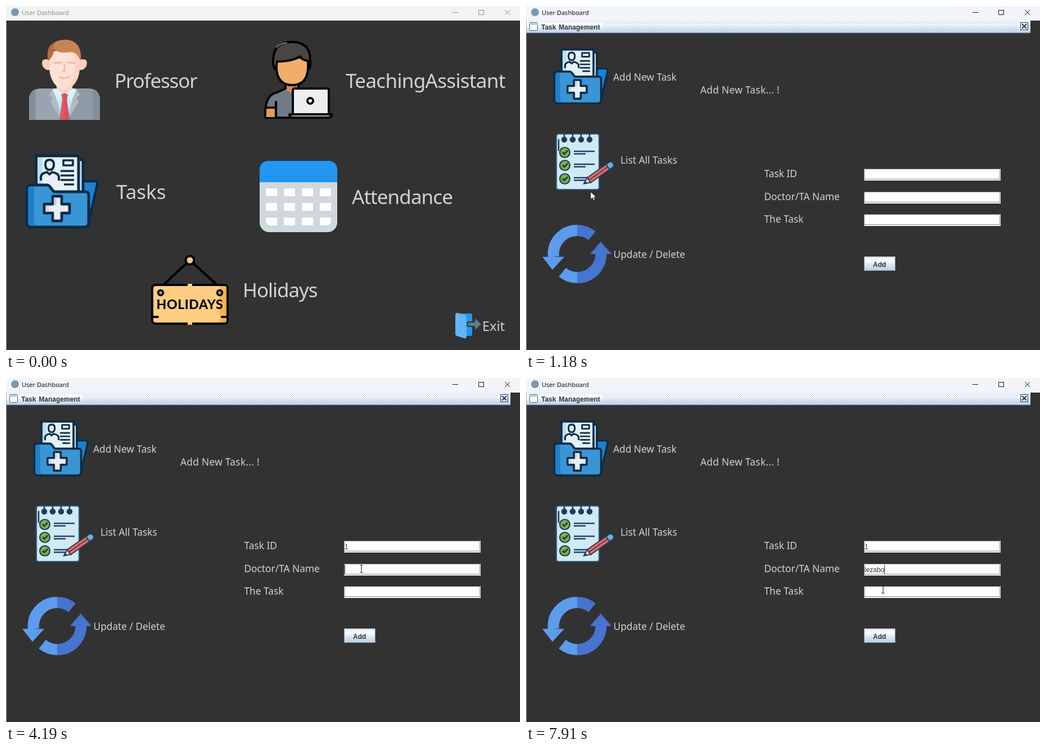
An HTML page that plays this animation: 914 px wide and 613 px high, repeating every 8000 ms.

```html
<!DOCTYPE html>
<html lang="en">
<head>
<meta charset="utf-8">
<title>User Dashboard</title>
<style>
  html, body { margin: 0; width: 100%; height: 100%; overflow: hidden; background: #323232; }
  svg { display: block; }
  text { white-space: pre; }
  .label { font-family: "Noto Sans", sans-serif; fill: #d2d2d2; }
  .big { font-size: 35px; }
  .small { font-size: 17.3px; }
  .ui { font: 12px "Liberation Sans", Arial, sans-serif; fill: #333; }
  .bold { font-weight: bold; }
  .ink { fill: none; stroke: #000; stroke-width: 4; stroke-linecap: round; stroke-linejoin: round; }
  .navy { stroke: #0b2c44; stroke-width: 4.8; stroke-linejoin: round; }
</style>
</head>
<body>
<svg width="914" height="613" viewBox="0 0 914 613">
  <defs>
    <linearGradient id="metal" x2="0" y2="1">
      <stop offset="0" stop-color="#dde8f3"/><stop offset=".3" stop-color="#fff"/>
      <stop offset=".55" stop-color="#dde8f3"/><stop offset="1" stop-color="#b8cfe5"/>
    </linearGradient>
    <linearGradient id="bar" x2="0" y2="1">
      <stop offset="0" stop-color="#e6eef7"/><stop offset=".3" stop-color="#fff"/><stop offset="1" stop-color="#b8cfe5"/>
    </linearGradient>
    <pattern id="bumps" width="4" height="4" patternUnits="userSpaceOnUse">
      <path d="M0 0h1v1h-1zM2 2h1v1h-1z" fill="#fff"/>
      <path d="M1 1h1v1h-1zM3 3h1v1h-1z" fill="#7d9fc4"/>
    </pattern>
    <g id="folder">
      <path class="navy" d="M119 312H157Q164 312 162 320L146 388Q143 394 136 394H110Z" fill="#1a83d2"/>
      <path class="navy" d="M122 274H137V345H122Z" fill="#bcdcf0"/>
      <path class="navy" d="M54 267H129V345H54Z" fill="#e6f0f8"/>
      <path d="M56 270H65V322H56Z" fill="#bcdcf0"/>
      <path class="navy" d="M70 282Q70 274 77.500 274T85 282Q85 292 77.500 292T70 282Z" fill="#e6f0f8" style="stroke-width:4"/>
      <path class="navy" d="M62 311V304Q63 298 73 296L77.500 300 82 296Q93 298 94 304V311" fill="none" style="stroke-width:4"/>
      <path class="navy" d="M102 275H119V284H102ZM97 294H121M97 302H121M97 310H121M103 318H121" fill="none" style="stroke-width:3.600"/>
      <path class="navy" d="M37 326Q37 319 44 319H73Q76 319 79 323L85 331H141Q147 331 147 337V386Q147 394 139 394H45Q37 394 37 386Z" fill="#3a95d6"/>
      <path d="M39.500 326Q39.500 321.500 45 321.500H50V380Q50 388 55 391.500H45Q39.500 391.500 39.500 385Z" fill="#1d7fcb"/>
      <path class="navy" d="M83 339H99V353H113V369H99V383H83V369H68V353H83Z" fill="#e8eef5"/>
      <path d="M85.500 341.500H90V355.500H85.500ZM70.500 355.500H76V366.500H70.500Z" fill="#c6d6e8"/>
    </g>
    <g id="field">
      <rect width="243" height="21" fill="#fff"/>
      <path d="M.5 20V.5H241.500V19M1 18.500H242" fill="none" stroke="#7a8a99"/>
    </g>
    <g id="check">
      <circle r="9" fill="#7cb342" stroke="#23395d" stroke-width="2.200"/>
      <path d="M-4-.5-1 3 5-3.500" fill="none" stroke="#1f3a52" stroke-width="2.800"/>
      <path d="M16-2H53M16 2.500H37" stroke="#23406b" stroke-width="2.400"/>
    </g>
  </defs>

  <rect width="914" height="613" fill="#323232"/>

  <g id="dashboard">
    <!-- professor -->
    <path d="M41 203V168Q41 149 60 147H148Q167 149 167 168V203Z" fill="#9aa4af"/>
    <path d="M104 147H148Q167 149 167 168V203H104Z" fill="#8f9aa6"/>
    <path d="M41 203V168Q41 152 53 148V203ZM155 148Q167 152 167 168V203H155Z" fill="#838f9b"/>
    <path d="M84 147H124L119 180 111 203H97L89 180Z" fill="#c4e8f7"/>
    <path d="M84 147 76 158 83 164 79 171 98 203H101ZM124 147 132 158 125 164 129 171 110 203H107Z" fill="#b2bbc4"/>
    <path d="M90 130H118V150L104 160 90 150Z" fill="#ffcfbf"/>
    <path d="M89 147 104 158 92 169 83 150ZM119 147 104 158 116 169 125 150Z" fill="#d9f3fc"/>
    <path d="M98 158 104 155 110 158 108 166 113 203H95L100 166Z" fill="#de5a64"/>
    <path d="M104 155 110 158 108 166 113 203H104Z" fill="#d4525d"/>
    <path d="M78 95H70Q64 95 64 102Q65 112 74 114H78ZM130 95H138Q144 95 144 102Q143 112 134 114H130Z" fill="#fdcdbc"/>
    <path d="M77 88Q82 78 104 78T131 88V112Q130 131 118 143Q104 156 90 143Q78 131 77 112Z" fill="#ffe0d4"/>
    <path d="M122 84H131V112Q130 131 118 143Q111 150 104 150Q122 136 122 112Z" fill="#ffd2c3"/>
    <path d="M85 101H99M109 101H123" stroke="#f9b9a8" stroke-width="3.500"/>
    <path d="M104 103V116H99M94 126Q104 132 114 125" fill="none" stroke="#f9b9a8" stroke-width="3"/>
    <path d="M75 98Q70 62 104 60Q136 60 133 98L128 89Q125 83 114 82Q95 85 86 78Q83 91 75 98Z" fill="#c68455"/>
    <path d="M75 98Q71 77 80 69Q85 66 88 66 82 75 86 78 83 91 75 98Z" fill="#b06f45"/>

    <!-- assistant -->
    <path class="ink" d="M461 199Q459 158 482 154L497 147V138H520V148L540 154V199Z" style="fill:#707b86"/>
    <path d="M499 138H518V150Q508 157 499 150Z" fill="#d78f4f"/>
    <path d="M463 182H478V198H463Z" fill="#e49b57"/>
    <path class="ink" d="M463 181H478M480 171V198"/>
    <path class="ink" d="M481 92V112Q483 141 509 141T537 112V92Z" style="fill:#f0ae69"/>
    <path class="ink" d="M480 113Q474 110 475 96Q476 64 508 64Q541 64 541 96V104Q541 110 538 112V98Q527 97 523 90Q508 99 482 99Z" style="fill:#4a4542"/>
    <path d="M480 74Q489 65 500 66" fill="none" stroke="#67605c" stroke-width="3"/>
    <rect class="ink" x="510" y="147" width="64" height="47" rx="3" style="fill:#ededed"/>
    <circle cx="541" cy="169" r="5" fill="#fff" stroke="#000" stroke-width="4"/>
    <path class="ink" d="M504 193H579Q579 199 572 199H511Q504 199 504 193Z" style="fill:#a9afb5"/>

    <use href="#folder"/>

    <!-- calendar -->
    <rect x="451" y="276" width="138" height="127" rx="17" fill="#cfd8dc"/>
    <path d="M451 314V293Q451 276 468 276H572Q589 276 589 293V314Z" fill="#2196f3"/>
    <g id="days" fill="#fff"></g>

    <!-- sign -->
    <path d="M282 495 327 453 373 495" class="ink"/>
    <circle cx="327" cy="453" r="7.500" fill="#ffcb80" stroke="#000" stroke-width="4"/>
    <rect class="ink" x="260" y="497" width="134" height="69" rx="6" style="fill:#ffcd82"/>
    <path d="M380 499H389Q392 499 392 503V560Q392 564 388 564H380Z" fill="#f6b347"/>
    <path d="M323 497H331M323 566H331" stroke="#ffcd82" stroke-width="4"/>
    <path class="ink" d="M262 554H270M384 554H392"/>
    <g fill="#999" stroke="#000" stroke-width="3.500"><circle cx="275" cy="511" r="4.500"/><circle cx="380" cy="511" r="4.500"/></g>
    <text x="267.500" y="540" font-family="Lato, sans-serif" font-size="23" font-weight="800" letter-spacing=".6">HOLIDAYS</text>

    <!-- exit -->
    <rect x="806" y="548" width="23" height="40" rx="3" fill="#2196f3"/>
    <path d="M799 551Q799 546 804 547L816 551Q819 552 819 556V589Q819 593 815 592L802 588Q799 587 799 584Z" fill="#64b5f6"/>
    <path d="M824 564H834V557L845 567 834 577V570H824Q821 570 821 567T824 564Z" fill="#607d8b" stroke="#323232" stroke-width="4" paint-order="stroke"/>

    <g class="label big">
      <text x="193" y="145.500" letter-spacing="-1.180">Professor</text>
      <text x="604" y="145.500" letter-spacing="-.68">TeachingAssistant</text>
      <text x="196" y="344">Tasks</text>
      <text x="615" y="353" letter-spacing="-.94">Attendance</text>
      <text x="421" y="519" letter-spacing="-1.050">Holidays</text>
      <text x="847" y="579" font-size="23.500">Exit</text>
    </g>
  </g>

  <g id="tasks">
    <rect x="1" y="26" width="896" height="22" fill="url(#bar)"/>
    <rect x="136" y="29" width="738" height="16" fill="url(#bumps)"/>
    <path d="M1 48H897" stroke="#6382bf"/>
    <rect x="6.500" y="29.500" width="14" height="14" rx="1" fill="#fff" stroke="#44586e"/>
    <path d="M8 31H19V33H8Z" fill="#a3b8cc"/>
    <rect x="879.500" y="29.500" width="13" height="13" fill="#e8f0f8" stroke="#223a63"/>
    <path d="M882 32 890 40M890 32 882 40" stroke="#223a63" stroke-width="2"/>
    <text class="ui bold" x="27" y="42" word-spacing="1.500">Task Management</text>

    <use href="#folder" transform="translate(22.600 -124) scale(.755)"/>

    <!-- task list -->
    <rect x="54" y="228" width="76" height="99" rx="4" fill="#cfeaf3" stroke="#2b5b83" stroke-width="2.200"/>
    <path d="M58 237V258" stroke="#23395d" stroke-width="2.500"/>
    <g id="rings" fill="#23395d" stroke="#23395d" stroke-width="2.500"></g>
    <use href="#check" x="69" y="261"/><use href="#check" x="69" y="284"/><use href="#check" x="69" y="308"/>
    <g transform="translate(103 316.500) rotate(-35)" stroke="#23395d" stroke-width="1.800">
      <path d="M0 0 11-5.500V5.500Z" fill="#f4c9a0"/>
      <path d="M11-5.500H52V5.500H11Z" fill="#e56a62"/>
      <path d="M11 0H52" stroke-width="1.400"/>
      <path d="M52-5.500H59Q63-5 63 0T59 5.500H52Z" fill="#6fb0d2"/>
      <path d="M0 0 4-2V2Z" fill="#23395d"/>
    </g>

    <!-- refresh -->
    <g fill="none" stroke-width="20">
      <path d="M49 447A42 42 0 0 1 91 400" stroke="#5d9cec"/>
      <path d="M91 400A42 42 0 0 1 117.400 409.400" stroke="#4674d0"/>
      <path d="M133 437A42 42 0 0 1 91 484" stroke="#4674d0"/>
      <path d="M91 484A42 42 0 0 1 64.600 474.600" stroke="#5d9cec"/>
    </g>
    <path d="M29 447H68L47 470Z" fill="#5d9cec"/><path d="M114 442H152L133 420Z" fill="#4674d0"/>

    <g class="label small">
      <text x="155" y="133">Add New Task</text>
      <text x="310" y="155.500" letter-spacing=".3">Add New Task... !</text>
      <text x="168" y="281">List All Tasks</text>
      <text x="155.500" y="449">Update / Delete</text>
      <text x="423.500" y="305">Task ID</text>
      <text x="423.500" y="346">Doctor/TA Name</text>
      <text x="423.500" y="386">The Task</text>
    </g>
    <use href="#field" x="601" y="290"/><use href="#field" x="601" y="331"/><use href="#field" x="601" y="371"/>
    <rect x="601.500" y="446.500" width="55" height="25" fill="url(#metal)" stroke="#7a8a99"/>
    <text class="ui bold" x="617" y="464.500">Add</text>
    <text class="ui" id="taskId" x="602" y="305"></text>
    <text class="ui" id="person" x="602" y="346"></text>
    <rect id="caret" width="1" height="16" fill="#333"/>
  </g>

  <rect y="26" width="1" height="587" fill="#a8a8a8"/>
  <g id="titleBar">
    <rect id="titleBack" width="914" height="26"/>
    <circle cx="16" cy="11" r="7" fill="#7b98b3"/>
    <text id="title" x="28" y="16" font-family="Noto Sans, sans-serif" font-size="11">User Dashboard</text>
    <path id="buttons" d="M794 11.500H804M840.500 7.500H849.500V15.500H840.500ZM887 7 896.500 16M896.500 7 887 16" fill="none"/>
  </g>

  <circle id="halo" r="12" fill="#e6e62e" fill-opacity=".68"/>
  <path id="arrow" d="M0 0V13.500L3.200 10.500 5.300 15.200 7.500 14.200 5.400 9.700H9.500Z" fill="#fff" stroke="#222" stroke-width=".7"/>
  <path id="beam" d="M-2.500-6.500H-.8L0-6 .8-6.500H2.500M0-6V6M-2.500 6.500H-.8L0 6 .8 6.500H2.500" fill="none" stroke="#222" stroke-width="1.100"/>
</svg>
<script>
const $ = id => document.getElementById(id);
const NS = "http://www.w3.org/2000/svg";
const LOOP = 8000, TICK = 70;

function add(parent, tag, attrs) {
  const el = document.createElementNS(NS, tag);
  for (const k in attrs) el.setAttribute(k, attrs[k]);
  $(parent).append(el);
}
for (let i = 0; i < 12; i++)
  add("days", "rect", { x: 462 + i % 4 * 32, y: 325 + (i >> 2) * 26, width: 20, height: 14 });
add("days", "path", { d: "M462 384V391H470Q463 390 462 384ZM578 384V391H570Q577 390 578 384Z", fill: "#cfd8dc" });
for (let i = 0; i < 4; i++) {
  add("rings", "circle", { cx: 68 + i * 15, cy: 238, r: 4 });
  add("rings", "path", { d: `M${68 + i * 15} 224V238` });
}

// Pointer moves: start, end, from x, y, to x, y
const moves = [
  [250, 1050, 806, 606, 115, 331],
  [1180, 1910, 115, 331, 636, 309],
  [1970, 2110, 637, 303, 638.5, 299],
  [3440, 3510, 638.5, 299, 637.5, 299],
  [3510, 3990, 637.5, 299, 632, 340],
  [7310, 7450, 632, 340, 639, 358],
  [7450, 7580, 639, 358, 635, 375],
  [7840, 7910, 635, 375, 635, 377],
];
const clicks = [[1050, 1180], [2110, 2240], [4060, 4190]];
const NAME = "lezabo";
const keys = [5120, 5320, 5590, 5790, 6250, 6590];
const caretOn = [[2170, 2700], [2970, 3510], [4120, 4590], [5120, 7120], [7580, 8000]];

const within = (list, t) => list.some(([a, b]) => t >= a && t < b);
const show = (id, on) => $(id).setAttribute("visibility", on ? "inherit" : "hidden");
const place = (id, x, y) => $(id).setAttribute("transform", `translate(${x} ${y})`);

function pointer(t) {
  const m = moves.findLast(m => t >= m[0]) || moves[0];
  const [a, b, x0, y0, x1, y1] = m;
  const held = t >= b ? b : a + Math.floor((t - a) / TICK) * TICK;
  const p = (held - a) / (b - a), e = p * p * (3 - 2 * p);
  return [x0 + (x1 - x0) * e, y0 + (y1 - y0) * e];
}

function render(t) {
  const active = t >= 1120, open = t >= 1180;
  show("dashboard", !open);
  show("tasks", open);
  $("titleBack").setAttribute("fill", active ? "#f2f5fa" : "#f2f4f3");
  $("title").setAttribute("fill", active ? "#111" : "#8b8b8b");
  $("buttons").setAttribute("stroke", active ? "#111" : "#8b8b8b");

  $("taskId").textContent = t >= 2970 ? "1" : "";
  $("person").textContent = NAME.slice(0, keys.filter(k => t >= k).length);
  const second = t >= 4000, line = $(second ? "person" : "taskId");
  const width = line.textContent ? line.getComputedTextLength() : 0;
  place("caret", Math.floor(602 + width), second ? 333 : 292);
  show("caret", open && within(caretOn, t));

  const [x, y] = pointer(t);
  for (const id of ["halo", "arrow", "beam"]) place(id, x, y);
  show("halo", within(clicks, t));
  show("arrow", t >= 250 && t < 1970);
  show("beam", t >= 1970);
}

const start = performance.now();
function frame() {
  render((performance.now() - start) % LOOP);
  requestAnimationFrame(frame);
}
render(0);
requestAnimationFrame(frame);
</script>
</body>
</html>
```
